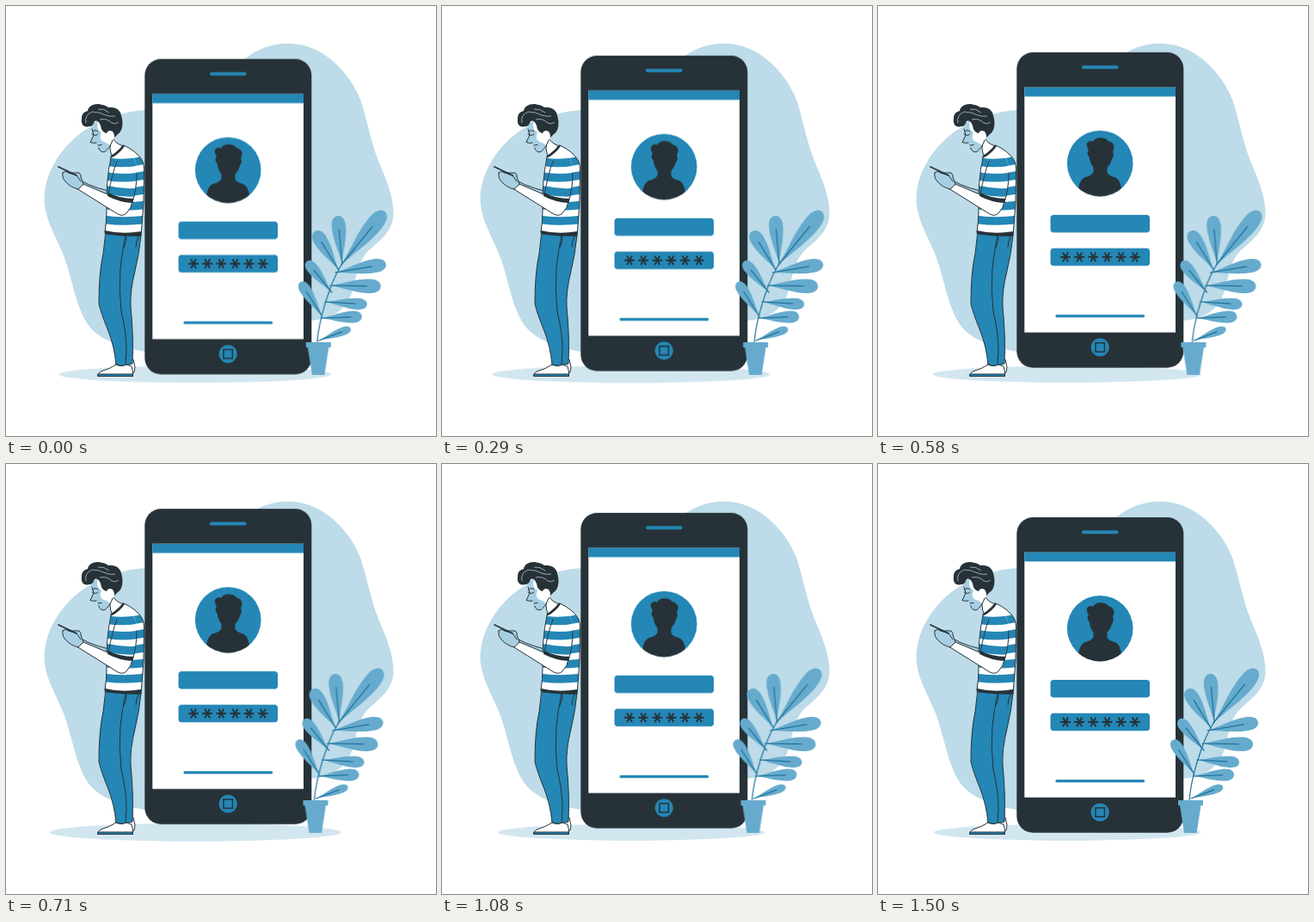
Write an HTML page that moves like this. It is 500 px wide and 500 px high and loops after 1540 ms.

```html
<!DOCTYPE html>
<html lang="en">
<head>
<meta charset="utf-8">
<title>Login</title>
<style>
  html, body { margin: 0; height: 100%; overflow: hidden; background: #fff; }
  svg { display: block; width: 100%; height: 100%; }
  :root { --blue: #2487b6; --dark: #263238; --soft: #a7cfe3; --leaf: #66abcd; }
  .blue { fill: var(--blue); }
  .dark { fill: var(--dark); }
  .leaf { fill: var(--leaf); }
  .ink { stroke: var(--dark); stroke-width: 1; stroke-linejoin: round; stroke-linecap: round; }
  .line { fill: none; stroke: var(--blue); stroke-linecap: round; }
  .vein { fill: none; stroke: #1d719b; stroke-width: 1.2; stroke-linecap: round; }
  .none { fill: none; }
  .white { fill: #fff; }
  .soft { fill: var(--soft); }
  .bands { fill: none; stroke: var(--blue); stroke-width: 9.5; }

  #shadow { transform-origin: 220px 428.3px; animation: beat 1540ms linear infinite; }
  #phone { animation: hover 1540ms linear infinite; }
  #plant { animation: shake 1540ms linear infinite; }

  @keyframes hover {
    0% { transform: translateY(-.4px); }
    46.75% { transform: translateY(-10px); }
    95.45%, 100% { transform: translateY(0); }
  }
  @keyframes beat {
    0% { transform: scale(1.02); }
    7.79% { transform: scale(1.1); }
    27.27%, 37.01% { transform: scale(1); }
    46.75% { transform: scale(1.1); }
    56.49%, 100% { transform: scale(1); }
  }
  @keyframes shake {
    0% { transform: translateX(-.2px); }
    7.79%, 85.71% { transform: translateX(-1px); }
    17.53%, 75.97% { transform: translateX(2px); }
    27.27%, 46.75%, 66.23% { transform: translateX(-4px); }
    37.01%, 56.49% { transform: translateX(4px); }
    95.45%, 100% { transform: translateX(0); }
  }
</style>
</head>
<body>
<svg viewBox="0 0 500 500">
  <defs>
    <clipPath id="disc"><circle cx="258.200" cy="191.200" r="38.300"/></clipPath>
    <clipPath id="top"><path id="shirt" d="M122 176L137 162Q152 169 158 179Q161 184 160.500 195Q161 230 157 267Q135 268 115 263Q117 250 117 238Q116 205 122 176Z"/></clipPath>
    <clipPath id="arm"><path id="sleeve" d="M129 178Q135 168 146 174Q153 180 152 200Q151 215 147 228L119 219Q123 195 129 178Z"/></clipPath>
    <path id="star" d="M-5.900 0H5.900M-3-5.200L3 5.200M-3 5.200L3-5.200"/>
  </defs>

  <path fill="#bddbe8" d="M328 43.500C368 43.500 400 77 412.500 110C421 137 424 157 433 180C443 204 451 222 450.500 243C449 263 434 273 421 285C407 300 408 318 402 334C395 354 378 365 350 366C300 370 260 410 190 405C150 403 110 392 95 370C79 345 77 312 64 283C53 259 44.500 243 44.500 224C45 196 62 166 88 147C108 133 134 122 165 121C225 118 240 85 277 62C292 50 309 43.500 328 43.500Z"/>
  <ellipse id="shadow" cx="220" cy="428.300" rx="155" ry="9.600" fill="#d2e6f0"/>

  <g id="phone">
    <rect class="dark" x="161.300" y="62" width="194" height="366.700" rx="19"/>
    <path class="line" stroke-width="4" d="M239 79.300H277.500"/>
    <rect class="white" x="170.300" y="102.700" width="175.700" height="285"/>
    <rect class="blue" x="170.300" y="102.700" width="175.700" height="10.700"/>
    <circle class="blue" cx="258.200" cy="191.200" r="38.300"/>
    <path class="dark" clip-path="url(#disc)" d="M245.500 183Q242.500 181 244 177L245 176Q241 169 244 166.500Q248 164 250 166Q253 160.500 261 161.500Q266 162 267.500 165Q275 167 274.500 173L273 178Q275 182 272.500 185Q271 191 266.500 196V202Q268 205 276 207.500Q282 210 283 222V232H233V220Q235 210 240 207.500Q249 205 250.500 201V196Q246.500 191 245.500 183Z"/>
    <rect class="blue" x="200.500" y="251" width="115.500" height="20.600" rx="3.800"/>
    <rect class="blue" x="200.500" y="289.700" width="115.500" height="20.600" rx="3.800"/>
    <g id="pin" class="none" stroke="#263238" stroke-width="1.900"></g>
    <path class="line" stroke-width="3.200" d="M208 368.700H308.500"/>
    <circle class="blue" cx="258.200" cy="405" r="10.600"/>
    <rect class="none" x="253" y="399.800" width="10.400" height="10.400" stroke="#263238" stroke-width="1.500"/>
  </g>

  <g id="man">
    <path class="white ink" d="M142 412L148 411L150 420L149 426L143 428Z"/>
    <path class="blue ink" d="M131 266L157 266Q155 288 150 308Q144 332 145 350Q148.500 385 147 416L138 418Q134 388 128 365Z"/>
    <path class="blue ink" d="M116 265L139 267Q135 285 133 305Q131 330 134 355Q140 380 140 400L139 419L128 417Q126 396 119 378Q110 356 108 346Q108 310 113 288Z"/>
    <path class="ink none" d="M140 268Q140 275 137 281M154 268Q151 274 151 280"/>
    <path class="white ink" d="M128 417Q134 420 140 417L146 419Q148 425 147.500 430.500H107Q106.500 427 110 425Q121 422 128 417Z"/>
    <path class="blue ink" d="M107 428H147.500V430.500H107Z"/>

    <path class="white ink" d="M123 153Q127 158 130 160L136 163Q133 171 124 176Q121 170 121 165Z"/>
    <path class="white" d="M99 139Q101 133 110 132H124L126 152Q122 163 116 169Q111 172 108 165Z"/>
    <path class="soft" d="M99 138L107 133Q104 143 111 147Q108 154 112 157Q119 160 121 162Q116 170 112 170Q108 169 107.500 165L106 161L98 158.500L101.500 150Z"/>
    <path class="ink none" d="M100 143L102 150L98 158.500Q102 160 105 159M107 162L111 161.500M107.500 165Q110 171 115 169.500Q121 165 124 156M100 149Q104 152 107 149M101 146Q104 143 107 146"/>
    <path class="dark" d="M97 140C90 142 87 137 88 131C88 125 91 123 95 122C96 116 103 113 110 114.500Q116 115 119 118C127 117 133 121 134 127C137 137 135 146 130 149L126 153Q126 145 121 145Q118 145 117 148Q111 147 110 139Q107 132 103 134Q101 140 97 140Z"/>
    <path class="none" stroke="#c7dbe3" stroke-width=".7" d="M93 136Q91 127 100 123Q109 123 116 127Q122 129 127 128M107 120Q114 119 120 124M109 132Q117 130 123 136Q128 138 131 135"/>

    <path class="soft ink" d="M84 200Q91 208 119 215L121 224L86 211Q76 208 72 201Z"/>
    <use href="#shirt" class="white"/>
    <g clip-path="url(#top)"><path class="bands" d="M112 180Q138 186 165 178M112 197Q138 203 165 196M112 213Q138 220 165 213M112 231Q138 235 165 231M112 248Q138 252 165 248"/></g>
    <use href="#shirt" class="none ink"/>
    <path class="dark" d="M115 261Q135 266 157.500 262L157 267.500Q135 268.500 114.500 264.500Z"/>
    <path class="none" stroke="#263238" stroke-width="2.500" d="M122 175.500Q132 170 137 162"/>

    <path class="white ink" d="M118 219Q130 226 147 227Q146 235 140 241Q136 245 130 242L82 212L89 207Z"/>
    <use href="#sleeve" class="white"/>
    <g clip-path="url(#arm)"><path class="bands" d="M112 180Q138 186 165 178M112 197Q138 203 165 196M112 212Q138 220 165 215"/></g>
    <path class="ink none" d="M129 180Q123 197 119 219M152 194Q152 214 147 228"/>
    <path class="dark" d="M119 217Q132 224 148.500 224L147 229Q131 228 118 221Z"/>

    <path class="soft ink" d="M66 194Q68 191 73 194L85 194Q88 196 87 199L90 207L84 213Q75 211 69 204Q65 200 66 194Z"/>
    <path class="none" stroke="#263238" stroke-width="1.700" stroke-linecap="round" d="M61 187L82 197"/>
    <path class="ink none" d="M73 194L82 197L87 204"/>
  </g>

  <g id="plant">
    <path class="vein" d="M362 391Q364 365 377 329Q383 312 392 298"/>
    <g id="leaves"></g>
    <path class="leaf" d="M349 391H378V397H375.500L370.500 429H356L351 397H349Z"/>
  </g>
</svg>
<script>
  const make = (parent, tag, attrs) => {
    const el = document.createElementNS('http://www.w3.org/2000/svg', tag);
    for (const key in attrs) el.setAttribute(key, attrs[key]);
    document.getElementById(parent).append(el);
  };

  for (let i = 0; i < 6; i++) {
    make('pin', 'use', { href: '#star', x: 218 + 16.15 * i, y: 300 });
  }

  // base x, base y, tip x, tip y, half width
  const leaves = [
    [390, 301, 440.5, 239, 9.5], [391, 300, 386, 244, 8.2],
    [387, 307, 359.5, 262, 8], [379, 333, 350, 297, 6.5],
    [368, 361, 342.5, 321, 6.5], [383, 310, 442, 300, 8],
    [377, 325, 436, 326, 8.2], [371, 344, 420, 347, 6.6],
    [367, 363, 414, 361, 7], [364, 389, 401, 375, 4.8]
  ];
  for (const [x, y, tx, ty, w] of leaves) {
    const len = Math.hypot(tx - x, ty - y);
    const turn = Math.atan2(ty - y, tx - x) * 180 / Math.PI;
    const transform = `translate(${x} ${y}) rotate(${turn})`;
    const d = `M0 0C${.3 * len} ${-.35 * w} ${.5 * len} ${-w} ${.78 * len} ${-w}` +
      `C${.94 * len} ${-w} ${len} ${-.5 * w} ${len} 0` +
      `C${len} ${.5 * w} ${.94 * len} ${w} ${.78 * len} ${w}` +
      `C${.5 * len} ${w} ${.3 * len} ${.35 * w} 0 0Z`;
    make('leaves', 'path', { class: 'leaf', d, transform });
    make('leaves', 'path', { class: 'vein', d: `M0 0H${.72 * len}`, transform });
  }
</script>
</body>
</html>
```
